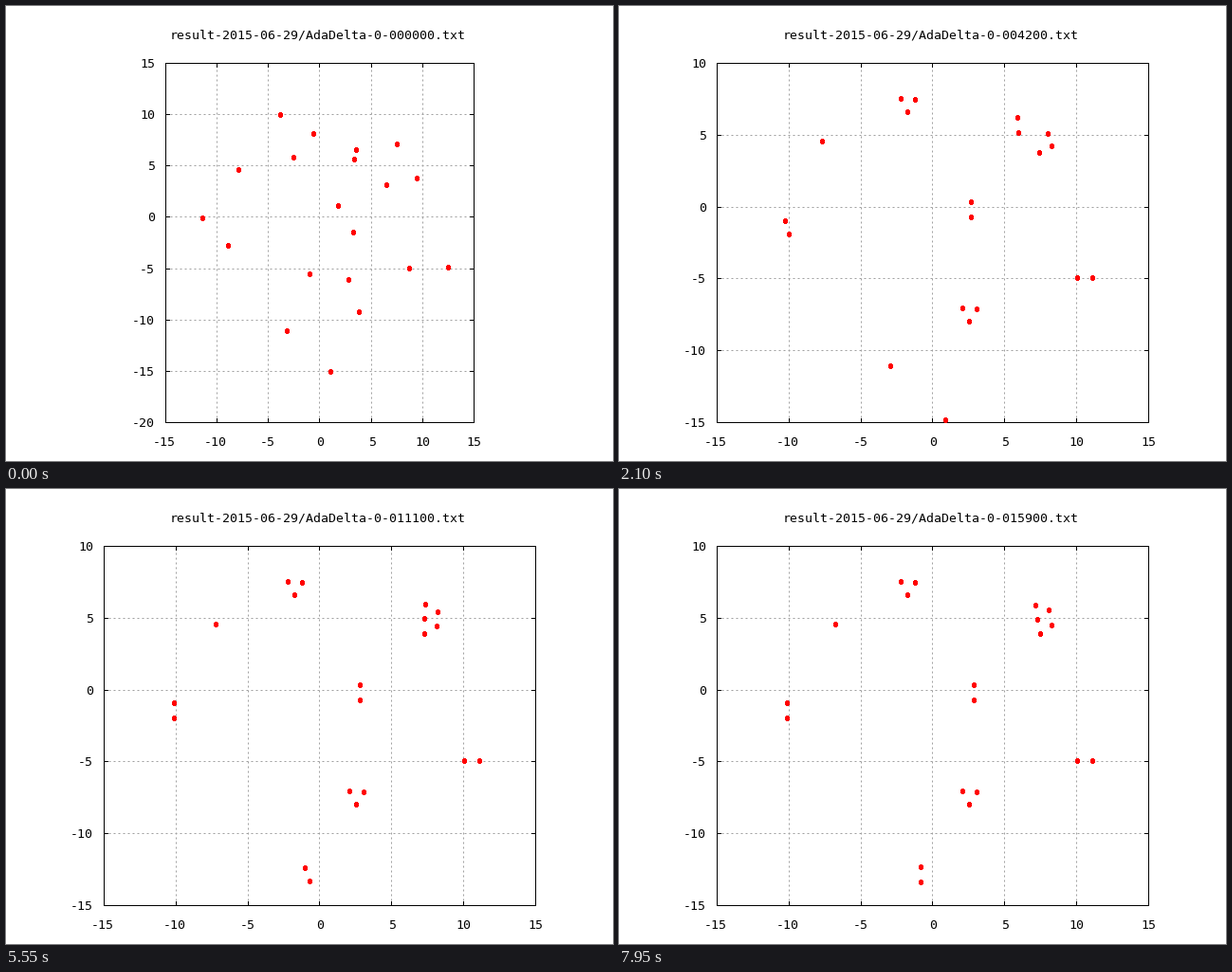
Recreate the animation shown at these times as a matplotlib script. Size 640 by 480 pixels, loop 8000 ms.

```python
import numpy as np
import matplotlib.pyplot as plt
from matplotlib.animation import FuncAnimation
from matplotlib.collections import PolyCollection

W, H, DPI = 640, 480, 100
FRAMES, STEP = 160, 50
PX = 72 / DPI                      # one pixel in points
TOP, BOTTOM = 60, 439
WIDE_ZERO = 330.5 + 222.4j         # origin of the plot, x + iy in pixels
TIGHT_ZERO = 330.5 + 211.6j
ZOOM = 1.4                         # tight view relative to the wide one
SWITCH = 4                         # first frame with the tight view
SETTLE = 23                        # end of the first rush
SPACING = 15.4                     # distance between touching points

plt.rcParams["font.family"] = "DejaVu Sans Mono"
FONT = 8 / 0.602 * PX              # 8 px per character


def glide(t, begin, end, power=1):
    return np.clip((t - begin) / (end - begin), 0, 1) ** power


def ring(n, degrees):
    """Corners of a regular n-gon with sides of one spacing."""
    radius = SPACING / 2 / np.sin(np.pi / n) if n > 1 else 0
    return radius * np.exp(1j * (np.radians(degrees)
                                 + 2 * np.pi * np.arange(n) / n))


def group(starts, center, angle=0, shift=0, turn=0, end=55, power=1):
    """Points that rush together into a ring, which then drifts and turns."""
    starts = (np.array(starts) - WIDE_ZERO) * ZOOM + TIGHT_ZERO

    def at(t):
        u = glide(t, SETTLE, end, power)
        home = center + shift * u + ring(len(starts), angle + turn * u)
        return home + (starts - home) * (1 - glide(t, 0, SETTLE)) ** 2
    return at


def merge(parts, goal, end, power):
    """Groups that are pulled into one common shape."""
    def at(t):
        p = np.concatenate([part(t) for part in parts])
        return p + (goal(t) - p) * glide(t, SETTLE, end, power)
    return at


def turning_pair(t):
    return 317.5 + 406j + ring(2, -130 + 40 * glide(t, 67, 141))


def swaying_five(t):
    fan = np.append(0, np.exp(1j * np.pi * (np.arange(4) / 3 - 0.5)))
    sway = 0.17 * np.cos(np.pi * (t - 81) / 69)
    return 446.6 + 136.3j + SPACING * (fan - fan.mean()) * np.exp(1j * sway)


GROUPS = [
    group([289 + 114j, 324 + 134j, 303 + 159j], 304.3 + 101.7j, -148),
    group([320 + 282j, 361 + 288j, 372 + 322j], 369.6 + 322.8j, -148),
    group([245 + 172j], 213 + 142j, shift=15, end=159, power=1.5),
    group([207 + 223j, 234 + 252j], 177 + 233j, -130, turn=40),
    group([350 + 210j, 366 + 238j], 370 + 214j, -90, shift=4, end=141),
    group([425 + 276j, 466 + 275j], 491 + 286j, 180),
    merge([group([296 + 342j], 285 + 379j),
           group([342 + 385j], 345 + 437j)], turning_pair, 67, 4.5),
    merge([group([367 + 161j, 369 + 151j], 386 + 118.5j, 90),
           group([412 + 145j, 433 + 181j, 401 + 188j], 450.3 + 150.7j, -111)],
          swaying_five, 47, 2),
]


def positions(i):
    p = np.concatenate([g(i) for g in GROUPS])
    if i < SWITCH:
        p = (p - TIGHT_ZERO) / ZOOM + WIDE_ZERO
    return np.round(np.column_stack([p.real, p.imag]))


def box(w, h):
    corners = np.array([(-1, -1), (1, -1), (1, 1), (-1, 1)])
    return corners * [w / 2, h / 2] + [0.5, 1]


fig = plt.figure(figsize=(W / DPI, H / DPI), dpi=DPI, facecolor="white")
ax = fig.add_axes([0, 0, 1, 1])
ax.set_xlim(0, W)
ax.set_ylim(H, 0)
ax.axis("off")


def line(x, y, **style):
    return ax.plot(x, y, lw=PX, snap=True, **style)[0]


def label(x, y, s, ha):
    return ax.text(x, y, s, size=FONT, ha=ha, va="baseline", color="black")


def build_view(left, right, low, high):
    parts = []
    black = dict(color="black", solid_capstyle="projecting", zorder=2)
    grid = dict(color="#a0a0a0", linestyle=(0, (2, 3)),
                dash_capstyle="butt", zorder=1)
    for v in range(-15, 16, 5):
        x = round(left + (v + 15) / 30 * (right - left))
        if abs(v) < 15:
            parts.append(line([x, x], [BOTTOM, TOP], **grid))
        for y, d in ((TOP, 4), (BOTTOM, -4)):
            parts.append(line([x, x], [y, y + d], **black))
        s = str(v)
        parts.append(label(x + 3 - 1.5 * len(s), 464, s, "center"))
    for v in range(low, high + 1, 5):
        y = round(BOTTOM - (v - low) / (high - low) * (BOTTOM - TOP))
        if low < v < high:
            parts.append(line([left, right], [y, y], **grid))
        for x, d in ((left, 4), (right, -4)):
            parts.append(line([x, x + d], [y, y], **black))
        parts.append(label(left - 11, y + 5, str(v), "right"))
    parts.append(line([left, right, right, left, left],
                      [TOP, TOP, BOTTOM, BOTTOM, TOP], **black))
    return parts


wide = build_view(168, 493, -20, 15)
tight = build_view(103, 558, -15, 10)
title = label(172.5, 35, "", "left")
dots = PolyCollection([], facecolors="red", edgecolors="none",
                      antialiaseds=False, zorder=3)
ax.add_collection(dots, autolim=False)


def draw(i):
    for part in wide:
        part.set_visible(i < SWITCH)
    for part in tight:
        part.set_visible(i >= SWITCH)
    title.set_text(f"result-2015-06-29/AdaDelta-0-{i * 100:06d}.txt")
    centers = positions(i)[:, None]
    dots.set_verts(np.concatenate([centers + box(5, 4), centers + box(3, 6)]))
    return [*wide, *tight, title, dots]


anim = FuncAnimation(fig, draw, frames=FRAMES, interval=STEP,
                     init_func=lambda: draw(0), repeat=True, repeat_delay=0)
plt.show()
```
